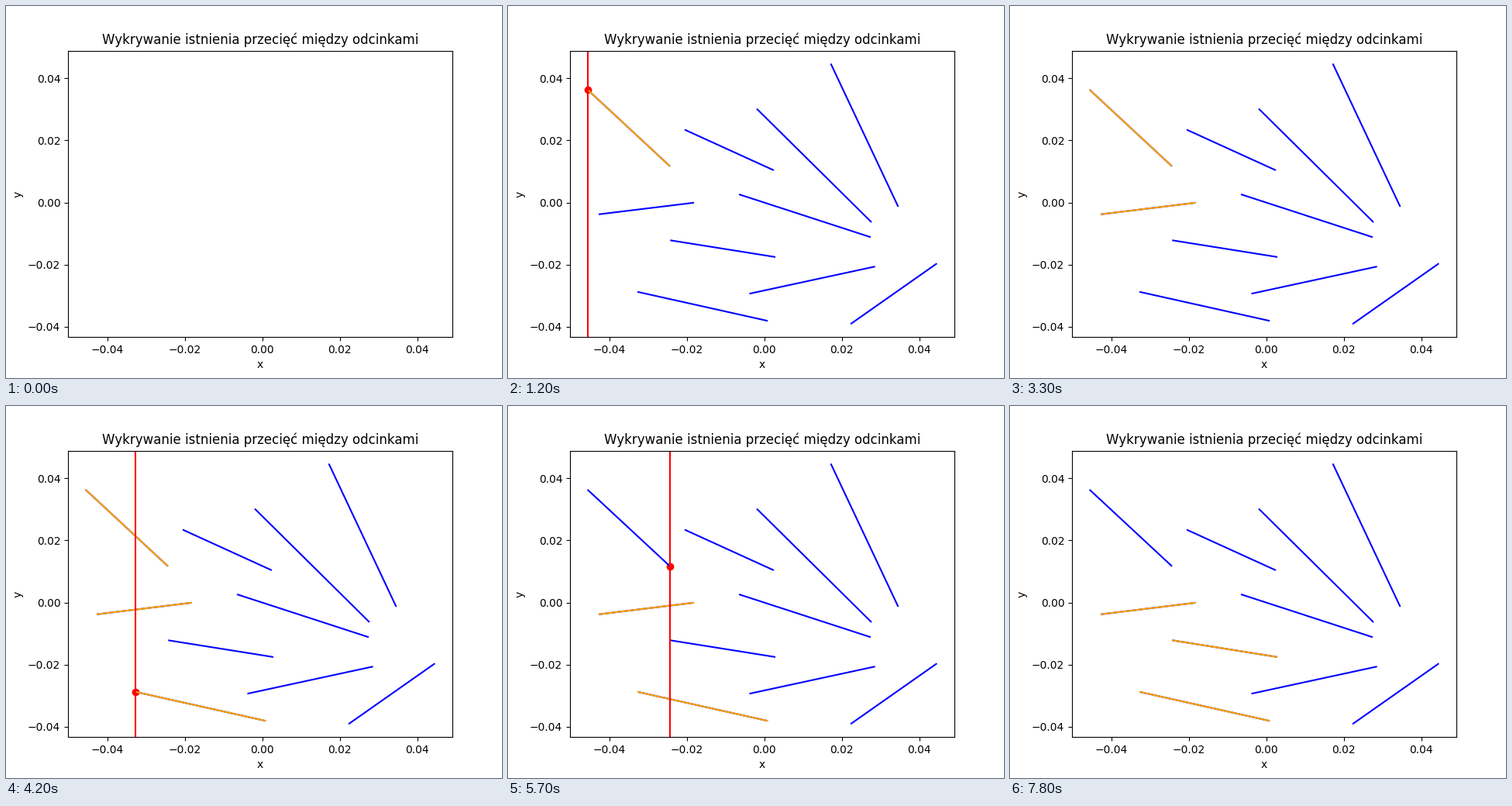
Write a matplotlib script that moves like this. It is 640 by 480 pixels and loops after 8 s.

```python
import matplotlib.pyplot as plt
import numpy as np
from matplotlib.animation import FuncAnimation
from matplotlib.collections import LineCollection

TICKS_PER_STEP = 3   # 100 ms ticks, 300 ms per step
STEPS_PER_EVENT = 5
XLIM, YLIM = (-0.0501, 0.0491), (-0.04335, 0.04894)
LEFT, RIGHT, TOP, BOTTOM = 80, 576, 57.6, 427.2

# Segment endpoints in stage pixels: x1, y1, x2, y2.
ENDPOINTS = np.array([
    (102.6, 107.9, 209.0, 206.8),
    (117.0, 268.8, 240.0, 253.8),
    (167.0, 368.8, 335.2, 406.3),
    (209.3, 302.3, 345.0, 323.9),
    (228.0, 159.6, 343.0, 212.0),
    (298.0, 243.0, 468.0, 298.3),
    (321.0, 132.6, 469.0, 279.0),
    (416.5, 74.4, 503.5, 259.0),
    (311.5, 371.2, 473.6, 336.2),
    (442.0, 410.4, 553.4, 332.2),
]).reshape(-1, 2, 2)


def to_data(pixels):
    x = np.interp(pixels[..., 0], (LEFT, RIGHT), XLIM)
    y = np.interp(pixels[..., 1], (TOP, BOTTOM), YLIM[::-1])
    return np.stack([x, y], axis=-1)


segments = to_data(ENDPOINTS)
# Sweep events in order of x: (segment, which end).
events = sorted(((i, end) for i in range(len(segments)) for end in (0, 1)),
                key=lambda e: segments[e[0], e[1], 0])

fig, ax = plt.subplots(figsize=(6.4, 4.8), dpi=100)
ax.set(xlim=XLIM, ylim=YLIM, xlabel="x", ylabel="y",
       title="Wykrywanie istnienia przecięć między odcinkami")

blue = LineCollection([], colors="blue", linewidths=1.5)
active = LineCollection([], colors="orange", linewidths=1.5)
sweep = LineCollection([], colors="red", linewidths=1.5)
for lines in (blue, active, sweep):
    ax.add_collection(lines, autolim=False)
dot = ax.scatter([0], [0], color="red")
ax.set(xlim=XLIM, ylim=YLIM)


def update(tick):
    step = tick // TICKS_PER_STEP
    # Phases: 0 idle, 1 sweep line, 2 + point, 3 status change, 4 point gone
    current, phase = divmod(max(step - 1, 0), STEPS_PER_EVENT)
    index, end = events[current]
    point = segments[index, end]

    status = set()
    for i, side in events[:current + (phase >= 3)]:
        (status.discard if side else status.add)(i)

    blue.set_segments(segments if step else [])
    active.set_segments([segments[i] for i in sorted(status)])
    sweep.set_segments([[(point[0], y) for y in YLIM]] if phase else [])
    dot.set_offsets([point])
    dot.set_visible(phase in (2, 3))
    return blue, active, sweep, dot


anim = FuncAnimation(fig, update, frames=80, interval=100,
                     repeat=True, repeat_delay=0)
plt.show()
```
